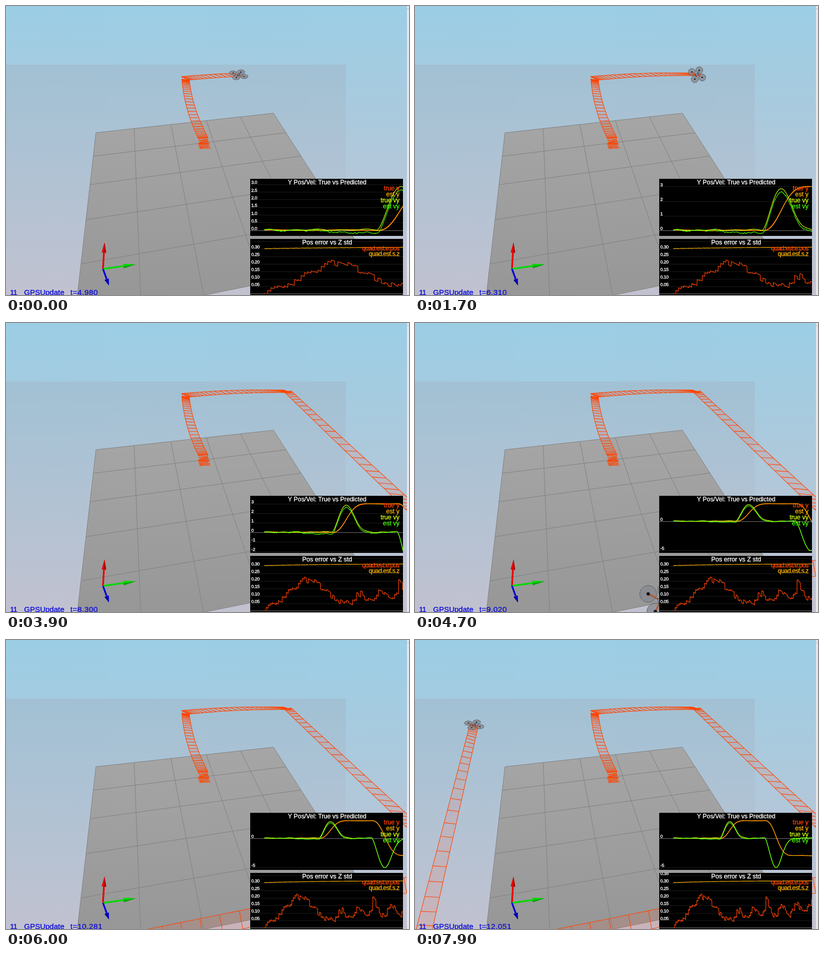
An HTML page with a canvas that plays this animation: 802 by 577 pixels, repeating every 8 s.

```html
<!DOCTYPE html>
<html lang="en">
<head>
<meta charset="utf-8">
<title>Quadrotor estimator</title>
<style>
html, body { margin: 0; width: 100%; height: 100%; overflow: hidden; background: #9bcee5; }
canvas { display: block; }
</style>
</head>
<body>
<canvas id="stage" width="802" height="577"></canvas>
<script>
const ctx = document.getElementById('stage').getContext('2d');
const LOOP = 8000, X0 = 514, X1 = 790, RUNG_STEP = .055;
const FONT = '"Liberation Sans", Arial, sans-serif';
const ORANGE = '#ff4400', AMBER = '#ffb400', LIME = '#d4ff10', GREEN = '#44ff00';

const lerp = (a, b, u) => a + (b - a) * u;
const clamp = v => Math.min(1, Math.max(0, v));
const rand = k => { const v = Math.sin(k * 127.1 + 3.7) * 43758.5453; return v - Math.floor(v); };
const bell = (t, mid, width) => Math.exp(-(((t - mid) / width) ** 2));

/* ---------- time ---------- */
// The simulation runs a little unevenly: [stage ms, simulated s]
const CLOCK = [[100, 4.98], [1700, 6.31], [2500, 6.985], [2900, 7.36], [3900, 8.3], [4700, 9.02], [6000, 10.281], [7900, 12.051]];
function simTime(ms) {
  let i = 0;
  while (i < CLOCK.length - 2 && CLOCK[i + 1][0] <= ms) i++;
  const [a, b] = [CLOCK[i], CLOCK[i + 1]];
  return lerp(a[1], b[1], clamp((ms - a[0]) / (b[0] - a[0])));
}
// The picture advances every 100 ms, with two longer holds.
function heldTime(ms) {
  const q = Math.floor(ms / 100) * 100;
  if (q < 200) return 0;
  return q > 2500 && q < 2900 ? 2500 : q;
}

/* ---------- controller response: position 0..1 and its speed ---------- */
function response(t, leg) {
  const s = Math.max(0, (t - leg.start) / leg.lag);
  return 1 - Math.exp(-(s ** 2.5));
}
function responseSpeed(t, leg) {
  const s = Math.max(0, (t - leg.start) / leg.lag);
  return 2.5 / leg.lag * s ** 1.5 * Math.exp(-(s ** 2.5));
}

// Flight legs. from/to: left x, y, right x, y of the trail; near: how much closer it gets.
const UP = { start: 1.2, lag: 1, near: 1, bend: [-6, 0], tilt: [.5, .5], from: [383, 265, 402, 263], to: [350, 146, 365, 149] };
const RIGHT = { start: 4.05, lag: 1.05, near: 1, bend: [0, -3], tilt: [.4, .75], from: [349, 141, 364, 148], to: [553, 134, 568, 139] };
const TOWARD = { start: 6.2, lag: 1.05, near: 1.33, bend: [0, 0], tilt: [1, .3], from: [553, 137, 568, 136], to: [820, 396, 855, 400] };
const LEFT = { start: 7.95, lag: 1.2, near: 1.35, bend: [0, 0], tilt: [1, 1], from: [880, 457, 886, 486], to: [10, 632, 18, 676] };
const AWAY = { start: 10, lag: 1.05, near: .4, bend: [0, 0], tilt: [.8, .56], from: [-18, 655, 17, 655], to: [110, 166, 126, 171] };
const LEGS = [UP, RIGHT, TOWARD, LEFT, AWAY];

function rails(leg, t) {
  const u = response(t, leg), p = u / (u + (1 - u) * leg.near);
  return leg.from.map((v, i) => lerp(v, leg.to[i], p) + leg.bend[i % 2] * 4 * p * (1 - p));
}

/* ---------- plotted signals ---------- */
const wobble = t => .06 * Math.sin(2.1 * t + .4) * Math.sin(5.3 * t + 1) + .02;
const posY = t => 3 * response(t, RIGHT) - 6 * response(t, LEFT);
const trueY = t => posY(t) + .02 * Math.sin(3 * t);
const estY = t => posY(t) + .035 * Math.sin(2.3 * t + 1);
const trueVy = t => 3 * responseSpeed(t, RIGHT) - 6 * responseSpeed(t, LEFT) + wobble(t);
const estVy = t => trueVy(t) - .24 * bell(t, 4.4, 2.2) + .08 * (rand(Math.floor(t / .07)) - .5);
function errorTrend(t) {
  const late = clamp((t - 4.9) / .3);
  return .05 * (1 - Math.exp(-4 * t)) + .16 * bell(t, 2.6, 1.3) + .1 * bell(t, 8.08, .12)
    + late * (.035 + .008 * (t - 5) + .03 * Math.cos((t - 5.7) * 5.03));
}
function posError(t) {
  const k = Math.floor(t / .12), age = t / .12 - k;
  return Math.max(0, errorTrend(k * .12) + Math.min(t, 1) * .04 * (rand(k) - .5) - .008 * age);
}
const zStd = t => .3 + .012 * (1 - Math.exp(-t / 4)) + .0008 * (Math.floor(t / .1) % 2);

/* ---------- drawing helpers ---------- */
function path(pts, close) {
  ctx.beginPath();
  pts.forEach(p => ctx.lineTo(p[0], p[1]));
  if (close) ctx.closePath();
}
function line(color, width, ...pts) {
  path(pts);
  ctx.strokeStyle = color;
  ctx.lineWidth = width;
  ctx.stroke();
}
function shape(color, ...pts) {
  path(pts, true);
  ctx.fillStyle = color;
  ctx.fill();
}
function disc(color, x, y, rx, ry) {
  ctx.beginPath();
  ctx.ellipse(x, y, rx, ry, 0, 0, 7);
  ctx.fillStyle = color;
  ctx.fill();
}
function rect(color, x, y, w, h) {
  ctx.fillStyle = color;
  ctx.fillRect(x, y, w, h);
}
function gradient(y0, y1, a, b) {
  const g = ctx.createLinearGradient(0, y0, 0, y1);
  g.addColorStop(0, a);
  g.addColorStop(1, b);
  return g;
}
function text(s, x, y, size, color, align = 'left', spacing = 0) {
  ctx.font = size + 'px ' + FONT;
  ctx.letterSpacing = spacing + 'px';
  ctx.textAlign = align;
  ctx.fillStyle = ctx.strokeStyle = color;
  ctx.lineWidth = .35;
  ctx.fillText(s, x, y);
  ctx.strokeText(s, x, y);
}

/* ---------- scene ---------- */
// Floor coordinates (rows toward the viewer, columns to the right) in perspective
function floor(row, col) {
  const w = 1 - .086 * row + .0195 * col;
  return [(179 - 20.3 * row + 81 * col) / w, (253 + 21.2 * row - 3.63 * col) / w];
}
function drawScene() {
  rect(gradient(0, 577, '#9bcee5', '#c3c2d0'), 0, 0, 802, 577);
  rect(gradient(117, 577, 'rgba(160,176,192,.4)', 'rgba(180,186,200,.1)'), 0, 117, 676, 460);
  shape(gradient(214, 577, '#a6a6a6', '#979797'), floor(0, 0), floor(0, 5), floor(5, 5), floor(5, 0));
  for (let i = 0; i <= 5; i++) {
    line('#808080', 1, floor(i, 0), floor(i, 5));
    line('#808080', 1, floor(0, i), floor(5, i));
  }
}

function drawTrail(now) {
  for (let i = 0; i < 15; i++) {
    const y = 267 + i * 1.2;
    line(ORANGE, 1.1, [382 + rand(i) * 4, y + 2 * rand(i + 9)], [402 + rand(i + 5) * i * .45, y - 3 + 4 * rand(i + 20)]);
  }
  LEGS.forEach((leg, i) => {
    const end = Math.min(now, i < 4 ? LEGS[i + 1].start : now);
    const left = [], right = [], rungs = [];
    for (let t = leg.start; t < end + RUNG_STEP; t += RUNG_STEP) {
      const [a, b, c, d] = rails(leg, Math.min(t, end));
      left.push([a, b]);
      right.push([c, d]);
      if (t <= end) rungs.push([[a, b], [c, d]]);
    }
    if (end <= leg.start) return;
    shape('rgba(255,90,50,.13)', ...left, ...right.slice().reverse());
    [...rungs, left, right].forEach(pts => line(ORANGE, 1.1, ...pts));
  });
}

function drawQuad(now) {
  const leg = LEGS.filter(l => l.start <= now).pop();
  const [a, b, c, d] = rails(leg, now);
  const size = .46 * Math.hypot(c - a, d - b);
  const tilt = lerp(leg.tilt[0], leg.tilt[1], response(now, leg)), flat = Math.max(.6, tilt);
  const x = (a + c) / 2, y = (b + d) / 2;
  const p = [-1.5 * size, -.8 * tilt * size], q = [.65 * size, -1.3 * tilt * size];
  const hubs = [p, q, [-q[0], -q[1]], [-p[0], -p[1]]].map(h => [x + h[0], y + h[1]]);
  for (const h of hubs) {
    disc('rgba(135,138,145,.8)', h[0], h[1], size, size * tilt);
    ctx.strokeStyle = '#555a60';
    ctx.lineWidth = .9;
    ctx.stroke();
  }
  hubs.forEach((h, i) => {
    line(i === 1 ? '#333a80' : '#b3531f', size * .16, [x, y], h);
    disc('#15151c', h[0], h[1], size * .2, size * .2 * flat);
  });
  const r = size * .36, k = r * flat;
  shape('#aeb0dc', [x - r, y - k * .6], [x + r * .7, y - k], [x + r, y + k * .6], [x - r * .7, y + k]);
  ctx.strokeStyle = '#222238';
  ctx.lineWidth = 1;
  ctx.stroke();
}

function arrow(color, dark, x, y) {
  const ox = 193, oy = 525, dx = x - ox, dy = y - oy, len = Math.hypot(dx, dy);
  const nx = -dy / len, ny = dx / len, bx = x - dx * .38, by = y - dy * .38;
  line(color, 3.4, [ox, oy], [bx, by]);
  shape(color, [bx + nx * 4.5, by + ny * 4.5], [x, y], [bx - nx * 4.5, by - ny * 4.5]);
  shape(dark, [bx + nx * 4.5, by + ny * 4.5], [x, y], [bx + nx, by + ny]);
}

/* ---------- plots ---------- */
function plot(fn, color, now, toY) {
  const pts = [], n = 552;
  for (let i = 0; i <= n; i++) pts.push([lerp(X0, X1, i / n), toY(fn(now * i / n))]);
  line(color, 1.2, ...pts);
}
function panel(top, height, body) {
  ctx.save();
  ctx.beginPath();
  ctx.rect(486, top, 304, height);
  ctx.clip();
  rect('#000', 486, top, 304, height);
  body();
  ctx.restore();
}
function gridLine(y, bright) {
  rect(bright ? '#777' : '#1c1c1c', 486, Math.round(y), 304, 1);
}
function tick(v, y, digits) {
  gridLine(y, v === 0);
  text(v.toFixed(digits), 488, y - 3, 9.4, '#fff', 'left', digits ? -.45 : 0);
}

function drawStatePlot(now) {
  let lo = 0, hi = 0;
  for (let t = 0; t <= now; t += .02) {
    const v = [trueY(t), trueVy(t), estVy(t)];
    lo = Math.min(lo, ...v);
    hi = Math.max(hi, ...v);
  }
  const unit = 94 / (hi - lo), toY = v => 454.5 - (v - lo) * unit;
  const step = now < 5.2 ? .5 : hi - lo < 6 ? 1 : 5;
  panel(345, 114, () => {
    for (let k = -6; k <= 6; k++) {
      const y = toY(k * step);
      if (y > 352 && y < 457) tick(k * step, y, step < 1 ? 1 : 0);
    }
    plot(trueY, ORANGE, now, toY);
    plot(estY, AMBER, now, toY);
    plot(trueVy, LIME, now, toY);
    plot(estVy, GREEN, now, toY);
    text('Y Pos/Vel: True vs Predicted', 561, 352.5, 12.3, '#fff');
    [['true y', ORANGE], ['est y', AMBER], ['true vy', LIME], ['est vy', GREEN]]
      .forEach(([name, color], i) => text(name, 783, 365 + i * 11.7, 12.5, color, 'right'));
  });
}

function drawErrorPlot(now) {
  const toY = v => 574.5 - v * 300;
  panel(465, 112, () => {
    gridLine(574, true);
    for (let k = 1; k <= 7; k++) {
      if (k < 7 || now > 11.5) tick(k * .05, toY(k * .05), 2);
      else gridLine(toY(k * .05));
    }
    plot(posError, ORANGE, now, toY);
    plot(zStd, AMBER, now, toY);
    text('Pos error vs Z std', 589.5, 472.5, 12.6, '#fff');
    text('quad.est.e.pos', 783, 484.5, 12.3, ORANGE, 'right', -.45);
    text('quad.est.s.z', 783, 496, 12.3, AMBER, 'right', -.45);
  });
}

function draw(ms) {
  const now = simTime(ms), blue = '#1010d8';
  ctx.textBaseline = 'middle';
  ctx.lineJoin = 'round';
  drawScene();
  drawTrail(now);
  drawQuad(now);
  arrow('#e80000', '#a00000', 196, 472);
  arrow('#00d800', '#009a00', 259, 515.5);
  arrow('#0000d8', '#000090', 205, 558);
  drawStatePlot(now);
  drawErrorPlot(now);
  text('11', 8, 572.5, 15, blue, 'left', -1);
  text('GPSUpdate', 36, 572.5, 15, blue);
  text('t=' + now.toFixed(3), 128, 572.5, 15.5, blue, 'left', .4);
  rect('#e6e6ec', 798, 0, 4, 577);
  rect('#b4b8c2', 798, 5, 4, 1);
}

let shown = -1;
const begin = performance.now();
function advance() {
  const ms = heldTime((performance.now() - begin) % LOOP);
  if (ms !== shown) draw(shown = ms);
  requestAnimationFrame(advance);
}
advance();
</script>
</body>
</html>
```
